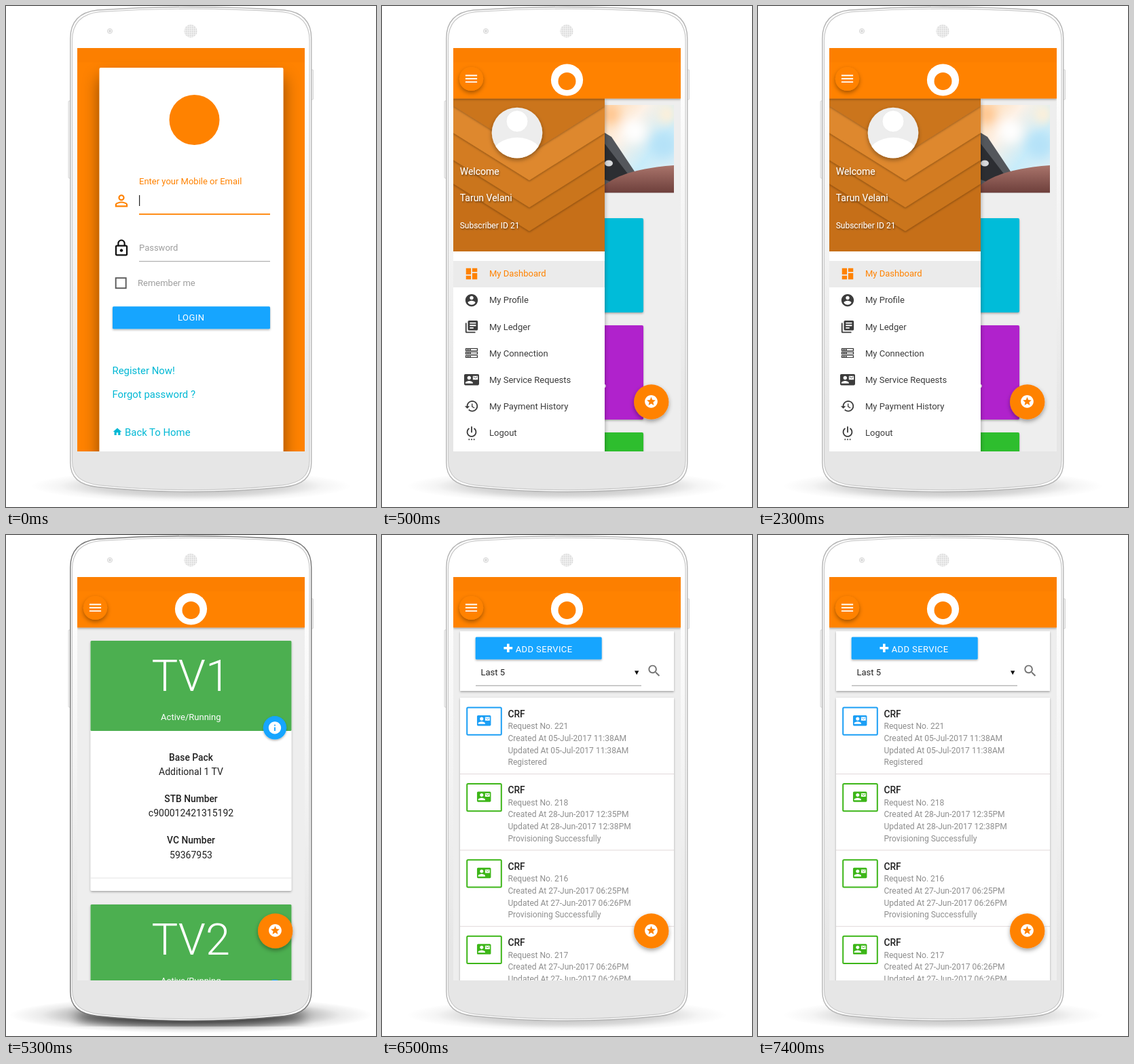
Animation of 545x739 px, one loop 8000 ms. Source, as an HTML page:

```html
<!DOCTYPE html>
<html lang="en">
<head>
<meta charset="utf-8">
<title>Subscriber app tour</title>
<style>
  html, body { margin: 0; width: 100%; height: 100%; overflow: hidden; background: #fff; }
  svg { display: block; width: 100vw; height: 100vh; }
  text { font-family: Roboto, Arial, sans-serif; }
</style>
</head>
<body>
<svg id="stage" viewBox="0 0 545 739" preserveAspectRatio="none">
  <defs>
    <clipPath id="screen"><rect x="105" y="62" width="335" height="595"/></clipPath>
    <clipPath id="avatar"><circle cx="199" cy="187" r="37.3"/></clipPath>
    <clipPath id="photo"><rect x="328" y="146" width="102" height="129.5"/></clipPath>
    <clipPath id="cover"><rect x="105" y="136.5" width="223" height="225.5"/></clipPath>
    <linearGradient id="body" x1="0" y1="0" x2="0" y2="1">
      <stop offset=".08" stop-color="#fff"/><stop offset=".5" stop-color="#f3f3f3"/>
      <stop offset=".85" stop-color="#e6e6e6"/>
    </linearGradient>
    <linearGradient id="sky" x1="0" y1="0" x2="1" y2="1">
      <stop offset="0" stop-color="#ffd9b0"/><stop offset=".3" stop-color="#fdf1e6"/>
      <stop offset=".6" stop-color="#c8ecfa"/><stop offset="1" stop-color="#e6eef3"/>
    </linearGradient>
    <linearGradient id="thumb" x1="0" y1="0" x2="0" y2="1">
      <stop offset="0" stop-color="#a9746b"/><stop offset="1" stop-color="#6d3f3b"/>
    </linearGradient>
    <radialGradient id="floor">
      <stop offset="0" stop-color="#000" stop-opacity=".62"/>
      <stop offset=".6" stop-color="#000" stop-opacity=".3"/>
      <stop offset=".82" stop-color="#000" stop-opacity=".08"/>
      <stop offset="1" stop-color="#000" stop-opacity="0"/>
    </radialGradient>
    <pattern id="mesh" width="3" height="3" patternUnits="userSpaceOnUse">
      <rect width="3" height="3" fill="#f1f1f1"/><circle cx="1.5" cy="1.5" r=".9" fill="#d6d6d6"/>
    </pattern>
    <filter id="low" x="-20%" y="-20%" width="140%" height="150%">
      <feDropShadow dx="0" dy="1.5" stdDeviation="1.6" flood-opacity=".32"/>
    </filter>
    <filter id="mid" x="-40%" y="-40%" width="180%" height="190%">
      <feDropShadow dx="0" dy="3" stdDeviation="3" flood-opacity=".36"/>
    </filter>
    <filter id="deep" x="-20%" y="-10%" width="140%" height="120%">
      <feDropShadow dx="0" dy="14" stdDeviation="12" flood-opacity=".46"/>
    </filter>
    <filter id="ink" x="-10%" y="-30%" width="120%" height="170%">
      <feDropShadow dx="1" dy="1.5" stdDeviation="1" flood-opacity=".5"/>
    </filter>
    <filter id="soft"><feGaussianBlur stdDeviation="8"/></filter>
  </defs>
  <g id="phone"></g>
  <g id="view" clip-path="url(#screen)"></g>
</svg>
<script>
const ORANGE = '#ff8200', BLUE = '#12a5ff', GREEN = '#4caf50', TEAL = '#00b8d4';
const LOOP = 8000;

const icons = {
  person: 'M12 5.9c1.16 0 2.1.94 2.1 2.1s-.94 2.1-2.1 2.1S9.9 9.16 9.9 8s.94-2.1 2.1-2.1m0 9c2.97 0 6.1 1.46 6.1 2.1v1.1H5.9V17c0-.64 3.13-2.1 6.1-2.1M12 4C9.79 4 8 5.79 8 8s1.79 4 4 4 4-1.79 4-4-1.79-4-4-4zm0 9c-2.67 0-8 1.34-8 4v3h16v-3c0-2.66-5.33-4-8-4z',
  lock: 'M12 17c1.1 0 2-.9 2-2s-.9-2-2-2-2 .9-2 2 .9 2 2 2zm6-9h-1V6c0-2.76-2.24-5-5-5S7 3.24 7 6v2H6c-1.1 0-2 .9-2 2v10c0 1.1.9 2 2 2h12c1.1 0 2-.9 2-2V10c0-1.1-.9-2-2-2zM8.9 6c0-1.71 1.39-3.1 3.1-3.1s3.1 1.39 3.1 3.1v2H8.9V6zM18 20H6V10h12v10z',
  home: 'M10 20v-6h4v6h5v-8h3L12 3 2 12h3v8z',
  menu: 'M3 18h18v-2H3v2zm0-5h18v-2H3v2zm0-7v2h18V6H3z',
  dashboard: 'M3 13h8V3H3v10zm0 8h8v-6H3v6zm10 0h8V11h-8v10zm0-18v6h8V3h-8z',
  account: 'M12 2C6.48 2 2 6.48 2 12s4.48 10 10 10 10-4.48 10-10S17.52 2 12 2zm0 3c1.66 0 3 1.34 3 3s-1.34 3-3 3-3-1.34-3-3 1.34-3 3-3zm0 14.2c-2.5 0-4.71-1.28-6-3.22.03-1.99 4-3.08 6-3.08 1.99 0 5.97 1.09 6 3.08-1.29 1.94-3.5 3.22-6 3.22z',
  books: 'M4 6H2v14c0 1.1.9 2 2 2h14v-2H4V6zm16-4H8c-1.1 0-2 .9-2 2v12c0 1.1.9 2 2 2h12c1.1 0 2-.9 2-2V4c0-1.1-.9-2-2-2zm-1 9H9V9h10v2zm-4 4H9v-2h6v2zm4-8H9V5h10v2z',
  server: [4, 9.5, 15].map(y => `M2 ${y}h20v4.6H2zM3.6 ${y + 1.5}v1.6h1.8v-1.6zM7 ${y + 1.5}v1.6h1.8v-1.6zM10.5 ${y + 1.2}v2.2h10v-2.2z`).join(''),
  contact: 'M21 8V7l-3 2-3-2v1l3 2 3-2zm1-5H2C.9 3 0 3.9 0 5v14c0 1.1.9 2 2 2h20c1.1 0 1.99-.9 1.99-2L24 5c0-1.1-.9-2-2-2zM8 6c1.66 0 3 1.34 3 3s-1.34 3-3 3-3-1.34-3-3 1.34-3 3-3zm6 12H2v-1c0-2 4-3.1 6-3.1s6 1.1 6 3.1v1zm8-6h-8V6h8v6z',
  history: 'M13 3c-4.97 0-9 4.03-9 9H1l3.89 3.89.07.14L9 12H6c0-3.87 3.13-7 7-7s7 3.13 7 7-3.13 7-7 7c-1.93 0-3.68-.79-4.94-2.06l-1.42 1.42C8.27 19.99 10.51 21 13 21c4.97 0 9-4.03 9-9s-4.03-9-9-9zm-1 5v5l4.28 2.54.72-1.21-3.5-2.08V8H12z',
  power: 'M7 24h2v-2H7v2zm4 0h2v-2h-2v2zm2-22h-2v10h2V2zm3.56 2.44l-1.45 1.45C16.84 6.94 18 8.83 18 11c0 3.31-2.69 6-6 6s-6-2.69-6-6c0-2.17 1.16-4.06 2.88-5.12L7.44 4.44C5.36 5.88 4 8.28 4 11c0 4.42 3.58 8 8 8s8-3.58 8-8c0-2.72-1.36-5.12-3.44-6.56zM15 24h2v-2h-2v2z',
  star: 'M11.99 2C6.47 2 2 6.48 2 12s4.47 10 9.99 10C17.52 22 22 17.52 22 12S17.52 2 11.99 2zm4.24 16L12 15.45 7.77 18l1.12-4.81-3.73-3.23 4.92-.42L12 5l1.92 4.53 4.92.42-3.73 3.23L16.23 18z',
  info: 'M12 2C6.48 2 2 6.48 2 12s4.48 10 10 10 10-4.48 10-10S17.52 2 12 2zm1 15h-2v-6h2v6zm0-8h-2V7h2v2z',
  search: 'M15.5 14h-.79l-.28-.27C15.41 12.59 16 11.11 16 9.5 16 5.91 13.09 3 9.5 3S3 5.91 3 9.5 5.91 16 9.5 16c1.61 0 3.09-.59 4.23-1.57l.27.28v.79l5 4.99L20.49 19l-4.99-5zm-6 0C7.01 14 5 11.99 5 9.5S7.01 5 9.5 5 14 7.01 14 9.5 11.99 14 9.5 14z'
};

const rect = (x, y, w, h, fill, more = '') =>
  `<rect x="${x}" y="${y}" width="${w}" height="${h}" fill="${fill}" ${more}/>`;
const disc = (x, y, r, fill, more = '') =>
  `<circle cx="${x}" cy="${y}" r="${r}" fill="${fill}" ${more}/>`;
const path = (d, fill, more = '') => `<path d="${d}" fill="${fill}" ${more}/>`;
const text = (x, y, size, fill, str, more = '') =>
  `<text x="${x}" y="${y}" font-size="${size}" fill="${fill}" ${more}>${str}</text>`;
const icon = (name, x, y, size, fill) =>
  path(icons[name], fill, `fill-rule="evenodd" transform="translate(${x - size / 2} ${y - size / 2}) scale(${size / 24})"`);

const LOW = 'filter="url(#low)"', MID = 'filter="url(#mid)"', INK = 'filter="url(#ink)"';
const CENTER = 'text-anchor="middle"', BOLD = 'font-weight="500"';

// Case outline with gently bowed ends, shrunk by an inset.
function shell(inset) {
  const mid = 272.3, l = 94.8 + inset, r = 2 * mid - l, t = 6 + inset, b = 709.5 - inset;
  const a = l + 40, z = r - 40;
  return `M${l} ${t + 42}C${l} ${t + 17} ${l + 13} ${t + 3} ${a} ${t}Q${mid} ${t - 9} ${z} ${t}` +
    `C${r - 13} ${t + 3} ${r} ${t + 17} ${r} ${t + 42}V${b - 36}` +
    `C${r} ${b - 14} ${r - 13} ${b - 3} ${z} ${b}Q${mid} ${b + 14} ${a} ${b}` +
    `C${l + 13} ${b - 3} ${l} ${b - 14} ${l} ${b - 36}z`;
}

function phone(dark) {
  const edge = dark ? '#777' : '#b4b4b4';
  return `<ellipse cx="272.5" cy="708" rx="${dark ? 268 : 236}" ry="${dark ? 27 : 24}" fill="url(#floor)" opacity="${dark ? 1 : .5}"/>` +
    (dark ? '<ellipse cx="272" cy="711" rx="170" ry="11" fill="#000" opacity=".7" filter="url(#soft)"/>' : '') +
    rect(92, 140, 5, 114, '#f2f2f2', 'rx="1" stroke="#ccc" stroke-width=".8"') +
    rect(447, 94, 5.5, 44, '#f2f2f2', 'rx="1" stroke="#ccc" stroke-width=".8"') +
    path(shell(0), '#fff', `stroke="${edge}" stroke-width="1.4"`) +
    path(shell(2.7), 'url(#body)', 'stroke="#c9c9c9" stroke-width="1.2"') +
    disc(153, 37, 3.6, '#f1f1f1', 'stroke="#d9d9d9"') + disc(153, 37, 1.4, '#d2d2d2') +
    disc(272, 37, 9.7, 'url(#mesh)');
}

const statusBar = () => rect(105, 62, 335, 21, '#fc7f00');

const header = () =>
  rect(105, 62, 335, 74.5, ORANGE, LOW) + statusBar() +
  disc(131.5, 107.5, 17.6, ORANGE, MID) +
  icon('menu', 131.5, 107.3, 23, '#fff') +
  disc(272.5, 109, 23.6, '#fff') + disc(272.5, 111, 13, ORANGE);

const fab = () => disc(396.7, 584, 25.7, ORANGE, MID) + icon('star', 396.5, 583.3, 22.5, '#fff');

function login() {
  const link = (x, y, s) => text(x, y, 14.9, TEAL, s);
  return rect(105, 62, 335, 595, ORANGE) + statusBar() +
    rect(137.5, 91, 271, 620, '#fff', 'rx="2" filter="url(#deep)"') +
    disc(277.5, 168, 37, ORANGE) +
    text(196, 263.3, 13, ORANGE, 'Enter your Mobile or Email') +
    icon('person', 170, 287.3, 27.5, ORANGE) +
    rect(196, 279, 1.2, 16, '#222') + rect(196, 306.2, 193, 1.8, ORANGE) +
    icon('lock', 170, 357, 27.5, '#111') +
    text(196, 360.5, 13, '#9e9e9e', 'Password') + rect(196, 376.2, 193, 1, '#9e9e9e') +
    rect(161.7, 401.2, 15, 15, 'none', 'stroke="#5a5a5a" stroke-width="1.9"') +
    text(194, 413.3, 13, '#9e9e9e', 'Remember me') +
    rect(157, 443.3, 232, 33, BLUE, `rx="1.5" ${LOW}`) +
    text(272.8, 464, 13, '#fff', 'LOGIN', `${CENTER} letter-spacing=".5"`) +
    link(156.5, 543, 'Register Now!') + link(156.5, 578, 'Forgot password ?') +
    icon('home', 164, 628, 15, TEAL) + link(175, 634, 'Back To Home');
}

function drawer() {
  const vee = (tip, fill) =>
    path(`M105 130V${tip - 70}L217 ${tip}L328 ${tip - 70}V130z`, fill, LOW);
  const items = [['dashboard', 'My Dashboard'], ['account', 'My Profile'], ['books', 'My Ledger'],
    ['server', 'My Connection'], ['contact', 'My Service Requests'],
    ['history', 'My Payment History'], ['power', 'Logout']];
  const rows = items.map(([name, label], i) => {
    const y = 395 + 39.05 * i;
    return icon(name, 132, y, 22, i ? '#3c3c3c' : ORANGE) +
      text(158, y + 4.4, 13, i ? '#3c3c3c' : ORANGE, label);
  }).join('');
  const photo = `<g clip-path="url(#photo)">` + rect(328, 146, 102, 130, 'url(#sky)') +
    `<g filter="url(#soft)">` + disc(372, 185, 17, '#fff') + disc(415, 205, 20, '#b5e2f8') +
    disc(420, 160, 14, '#fff0d8') + disc(336, 160, 14, '#ffc48c') + '</g>' +
    path('M328 187L338 193L374 247L360 275H328z', '#54575c') +
    path('M328 203L364 250L350 264L328 256z', '#2c2e32') +
    '<ellipse cx="334" cy="232" rx="6" ry="4.5" fill="#d7d9db"/>' +
    path('M328 264C350 246 390 238 430 235V276H328z', 'url(#thumb)') + '</g>';
  return rect(105, 62, 335, 595, '#eee') + photo +
    rect(300, 313, 85, 139, '#00bcd9', `rx="2" ${LOW}`) +
    rect(300, 471, 85, 139, '#b022cc', `rx="2" ${LOW}`) +
    rect(300, 629, 85, 60, '#2dbe2f', `rx="2" ${LOW}`) +
    disc(327, 560.5, 2.7, '#fff') +
    rect(105, 136, 223, 540, '#fff', MID) +
    `<g clip-path="url(#cover)">` + rect(105, 136, 223, 226, '#c66f18') +
    vee(332, '#ca741b') + vee(297, '#d37c22') + vee(257, '#de882d') + vee(217, '#cb741c') + '</g>' +
    disc(199, 187, 37.3, '#ededed', MID) +
    `<g clip-path="url(#avatar)">` + disc(199, 170, 16, '#fff', 'stroke="#e2e2e2" stroke-width=".6"') +
    '<ellipse cx="199" cy="222" rx="38" ry="28" fill="#fff"/></g>' +
    text(114.7, 249, 14, '#fff', 'Welcome', INK) +
    text(114.7, 288, 14, '#fff', 'Tarun Velani', INK) +
    text(114.7, 328, 12, '#fff', 'Subscriber ID 21', INK) +
    rect(105, 376, 223, 39, '#ebebeb') + rows + header() + fab();
}

function sets() {
  const card = (y, name) =>
    rect(124.5, y, 296, 369, '#fff', `rx="2" ${LOW}`) +
    rect(124.5, y, 296, 133, GREEN, 'rx="1.5"') +
    text(272.3, y + 74.3, 65, '#fff', name, `${CENTER} font-weight="300"`) +
    text(272.3, y + 117, 13, '#fff', 'Active/Running', CENTER) +
    disc(396, y + 128.3, 17.2, BLUE, LOW) + icon('info', 396, y + 128.3, 22, '#fff');
  const facts = [['Base Pack', 'Additional 1 TV'], ['STB Number', 'c900012421315192'], ['VC Number', '59367953']]
    .map(([head, value], i) => {
      const y = 332.7 + 61.3 * i;
      return text(272.5, y, 13.8, '#212121', head, `${CENTER} ${BOLD}`) +
        text(272.5, y + 21.3, 14, '#212121', value, CENTER);
    }).join('');
  return rect(105, 62, 335, 595, '#eee') + card(156, 'TV1') + facts +
    rect(124.5, 505.5, 296, 1, '#e3e3e3') + card(545, 'TV2') + header() + fab();
}

function requests() {
  const list = [
    [221, '05-Jul-2017 11:38AM', '05-Jul-2017 11:38AM', 'Registered'],
    [218, '28-Jun-2017 12:35PM', '28-Jun-2017 12:38PM', 'Provisioning Successfully'],
    [216, '27-Jun-2017 06:25PM', '27-Jun-2017 06:26PM', 'Provisioning Successfully'],
    [217, '27-Jun-2017 06:26PM', '27-Jun-2017 06:26PM', 'Provisioning Successfully']
  ].map(([no, made, changed, state], i) => {
    const y = 240 + 112.4 * i, tone = i ? '#3db618' : '#1c9ff5';
    const lines = [`Request No. ${no}`, `Created At ${made}`, `Updated At ${changed}`, state];
    return rect(125.2, y + 14.5, 50.6, 40.3, '#fff', `rx="1.5" stroke="${tone}" stroke-width="2"`) +
      icon('contact', 150.2, y + 33.7, 20.5, tone) +
      text(185.5, y + 28.7, 13.8, '#212121', 'CRF', BOLD) +
      lines.map((s, k) => text(185.5, y + 46.3 + 17.7 * k, 12.07, '#8e8e8e', s)).join('') +
      rect(115, y + 112, 315, 1, '#e2d9da');
  }).join('');
  return rect(105, 62, 335, 595, '#eee') +
    rect(115, 142, 315, 88, '#fff', LOW) + rect(115, 240, 315, 450, '#fff', LOW) +
    rect(137.7, 150.5, 186, 33, BLUE, `rx="1.5" ${LOW}`) +
    path('M184 160.5h3.6v4.4h4.6v3.6h-4.6v4.6H184v-4.6h-4.6v-3.6h4.6z', '#fff') +
    text(196.7, 172.7, 13, '#fff', 'ADD SERVICE', 'letter-spacing=".4"') +
    text(145.5, 207, 13, '#212121', 'Last 5') +
    path('M372 200.3h6.4L375.2 206.3z', '#111') + rect(138, 221.7, 244, 1, '#9a9a9a') +
    icon('search', 401, 200.3, 23, '#757575') + list + header() + fab();
}

const scenes = [[0, login], [500, drawer], [3500, sets], [6500, requests]];
const frame = document.getElementById('phone'), view = document.getElementById('view');
frame.innerHTML = [false, true].map(d => `<g>${phone(d)}</g>`).join('');
view.innerHTML = scenes.map(([, draw]) => `<g>${draw()}</g>`).join('');

const toggle = (group, pick) => [...group.children].forEach((el, i) =>
  el.setAttribute('display', i === pick ? 'inline' : 'none'));

let shown = -1;
function show(t) {
  const now = scenes.filter(([at]) => at <= t).length - 1;
  if (now === shown) return;
  shown = now;
  toggle(view, now);
  toggle(frame, now === 2 ? 1 : 0);
}

const start = performance.now();
function tick() {
  show((performance.now() - start) % LOOP);
  requestAnimationFrame(tick);
}
tick();
</script>
</body>
</html>
```
